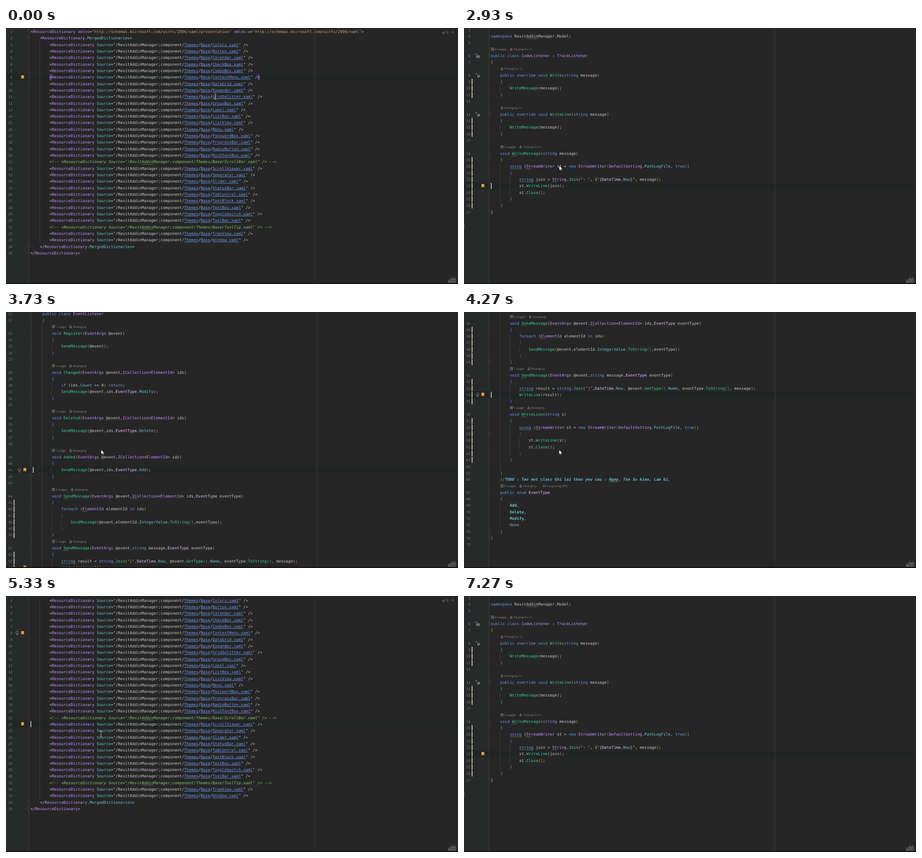
Write an HTML page that moves like this. It is 995x563 px and loops after 7390 ms.

```html
<!DOCTYPE html>
<html lang="en">
<head>
<meta charset="utf-8">
<title>Jumping between bookmarks</title>
<style>
html, body { margin: 0; width: 100%; height: 100%; overflow: hidden; background: #262626 }
svg { display: block }
text { white-space: pre; text-rendering: geometricPrecision; font: 8.655px "DejaVu Sans Mono", "Noto Sans Mono", monospace }
.num { font-size: 7.5px; fill: #747474; text-anchor: end }
.hint { font: 6.4px "Open Sans", "Noto Sans", sans-serif; fill: #8a8a8a }
.line { stroke: #3f3f3f; fill: none }
.thin { stroke: #959595; stroke-width: .8; fill: none }
</style>
</head>
<body>
<svg id="stage" width="995" height="563" viewBox="0 0 995 563"></svg>
<script>
const CW = 5.21, LH = 14.32, LOOP = 7390;
const GRAY = '#c4c4c4', BLUE = '#6c95eb', PURPLE = '#c191ff', CYAN = '#66c3cc',
  GREEN = '#39cc9b', STRING = '#c9a26d', LILAC = '#e1bfff', COMMENT = '#85c46c';
const PAREN = ['#e0a63e', '#4fae62', '#4d8ff0'];
const BRACE = ['#e0a63e', '#4fae62', '#4a86e8', '#46578a'];

const xmlRules = [
  [/<!--.*/y, COMMENT, 'font-style:italic'],
  [/"http[^"]*"/y, STRING],
  [/Themes|Base|\w+\.xaml/y, BLUE, 'text-decoration:underline 1px;text-underline-offset:1.4px;text-decoration-skip-ink:none'],
  [/Source|MergedDictionaries/y, CYAN],
  [/ResourceDictionary|xmlns(:x)?/y, PURPLE],
  [/\w+|./y, GRAY]
];
const codeRules = [
  [/\/\//y, COMMENT, 'font-style:italic'],
  [/TODO.*/y, '#62b8d0', 'font-style:italic;font-weight:bold'],
  [/"[^"{}]*"|\$"|"/y, STRING],
  [/\b(namespace|public|class|override|void|string|using|new|true|foreach|in|enum|if|return)\b/y, BLUE],
  [/\b(EventType|DateTime)\b/y, LILAC],
  [/\b(CodeListener|TraceListener|EventListener|StreamWriter|String|DefaultSetting|EventArgs|ICollection|ElementId)\b/y, PURPLE],
  [/\b(Add|Delete|Modify)(?=,)/y, CYAN, 'font-weight:bold'],
  [/\bNone\b/y, '#787878', 'font-weight:bold'],
  [/\w+(?=\()/y, GREEN],
  [/(?<=\.)(?!Model)[A-Z]\w*/y, CYAN],
  [/@?\w+|./y, GRAY]
];

const esc = s => s.replace(/&/g, '&amp;').replace(/</g, '&lt;');
const span = (s, fill, css = '') => `<tspan fill="${fill}" style="${css}">${esc(s)}</tspan>`;
const path = (d, attrs) => `<path d="${d}" ${attrs}/>`;
const move = (x, y, body, id = '') => `<g id="${id}" transform="translate(${x} ${y})">${body}</g>`;

function paint(s, rules) {
  let out = '', i = 0, depth = 0;
  while (i < s.length) {
    for (const [re, fill, css] of rules) {
      re.lastIndex = i;
      const m = re.exec(s);
      if (!m) continue;
      const word = m[0];
      const color = word === '(' ? PAREN[depth++] : word === ')' ? PAREN[--depth] : fill;
      out += span(word, color, css);
      i += word.length;
      break;
    }
  }
  return out;
}

// Spelling and analysis marks: text between two tildes gets underlined
function marks(raw, x, y) {
  let col = 0;
  return raw.split('~').map((part, i) => {
    const from = x + col * CW, w = part.length * CW;
    col += part.length;
    if (i % 2 === 0) return '';
    return part.length > 3
      ? path(`M${from} ${y + 6}` + 'l1.3 -1.3l1.3 1.3'.repeat(w / 2.6), 'fill="none" stroke="#6b9a58" stroke-width=".8"')
      : path(`M${from} ${y + 5.5}h${w}`, 'stroke="#8aa878" stroke-width="1.2" stroke-dasharray="1.3 1.6"');
  }).join('');
}

const fold = (x, y) => path(`M${x - 2.5} ${y - 3}h5v4l-2.5 2.5l-2.5 -2.5zM${x - 1} ${y - .5}h2`, 'fill="#262626" stroke="#464646" stroke-width=".8"');
const flag = (x, y) => path(`M${x - 3} ${y - 4.3}h6v8.2l-3 -2.4l-3 2.4z`, 'fill="#e3a33c"');

const hintIcons = [
  'M0 -2.7h5.4v5.4h-5.4zM1.5 1.2l2.4 -2.4m-1.8 0h1.8v1.8',
  'M2.7 -2.8a1.3 1.3 0 1 1 -.1 0zM.3 2.6q0 -2.4 2.4 -2.4t2.4 2.4z',
  'M1 2.2a2.6 2.6 0 1 1 3.4 0M1.4 2.6v-2.2M4 2.6v-2.2'
];
function hint(row, x0, y) {
  const [indent, ...parts] = row.slice(1).split('|');
  let x = x0 + indent * CW + 1;
  return parts.map((label, i) => {
    if (!label) return '';
    const out = move(x, y, path(hintIcons[i], 'class="thin"')) + `<text class="hint" x="${x + 7.6}" y="${y + 2.5}">${label}</text>`;
    x += 16 + (i ? 36 : label.length * 3.15);
    return out;
  }).join('');
}

// rows: code lines; those starting with '#' are unnumbered hints
function page(id, x0, y0, first, rows, rules, changed, extra) {
  let n = first, out = path(`M${x0 - 3.5} -600V1200M${x0 + 625.4} -600V1200`, 'class="line"');
  const open = [];
  rows.forEach((raw, r) => {
    const y = y0 + r * LH;
    if (raw[0] === '#') { out += hint(raw, x0, y); return; }
    const line = raw.replace(/~/g, ''), s = line.trim(), indent = line.length - line.trimStart().length;
    const x = x0 + indent * CW;
    let body = '';
    if (s === '{' || s === '}') {
      let color = BRACE[indent / 4];
      if (s === '{') {
        open.push(y);
        const afterUsing = /using/.test(rows[r - 1]);
        out += fold(x0 - 4, afterUsing ? y : y - LH);
      } else {
        const top = open.pop();
        if (top === undefined) color = '#8a8a8a';
        else if (indent) out += path(`M${x - .2} ${top + 7}V${y - 7}`, 'class="line"');
        out += fold(x0 - 4, y);
      }
      body = span(s, color);
    } else body = paint(s, rules);
    out += `<text class="num" x="14" y="${y + 3}">${n}</text><text x="${x}" y="${y + 3}">${body}</text>`;
    out += marks(raw, x0, y);
    if (changed.some(([a, b]) => n >= a && n <= b)) out += `<rect x="16.8" y="${y - 6.3}" width="2" height="12.8" fill="#cbbfa6"/>`;
    n++;
  });
  return `<g id="${id}">${out}${extra}</g>`;
}

// XAML page
const lineY = n => 8 + (n - 1) * LH;
const themes = ('Colors Button Calendar CheckBox ComboBox ContextMenu DataGrid Expander GridSplitter GroupBox Label ListBox ' +
  'ListView Menu PasswordBox ProgressBar RadioButton RichTextBox ScrollBar ScrollViewer Separator Slider StatusBar ' +
  'TabControl TextBlock TextBox ToggleSwitch ToolBar ToolTip TreeView Window').split(' ');
const entry = name => {
  const off = /ScrollBar|ToolTip/.test(name);
  const tag = `<ResourceDictionary Source="/${off ? 'Revit~Addin~Manager' : 'RevitAddinManager'};component/Themes/Base/${name}.xaml" />`;
  return ' '.repeat(8) + (off ? `<!-- ${tag} -->` : tag);
};
const schema = 'http://schemas.microsoft.com/winfx/2006/xaml';
const xaml = [
  `<ResourceDictionary xmlns="${schema}/presentation" xmlns:x="${schema}">`,
  '    <ResourceDictionary.MergedDictionaries>',
  ...themes.map(entry),
  '    </ResourceDictionary.MergedDictionaries>',
  '</ResourceDictionary>'
];
const xamlExtra = [1, 2, 34, 35].map(n => fold(50, lineY(n))).join('') +
  path(`M74.5 ${lineY(3) - 7}V${lineY(33) + 7}`, 'class="line"') +
  flag(36.5, lineY(8)) + `<g id="mark22">${flag(36.5, lineY(22))}</g>`;

// Listener page
const listener = `

namespace Revit~Addin~Manager.Model;

#0|2 usages|Thoang Vu +1
public class CodeListener : TraceListener
{
#4||Thoang Vu +1
    public override void Write(string message)
    {
        WriteMessage(message);
    }

#4||thoangray +1
    public override void WriteLine(string message)
    {
        WriteMessage(message);
    }

#4|2 usages|Thoang Vu +1
    void ~Wr~iteMessage(string message)
    {
        ~using~ (~St~reamWriter st = new StreamWriter(DefaultSetting.PathLogFile, true))
        {
            ~string~ join = ~St~ring.Join(": ", $"{DateTime.Now}", message);
            st.WriteLine(join);
            st.Close();
        }
    }
}`.split('\n').slice(1);
const override = y => path(`M25 ${y - 2}l2.2 -2.4l2.2 2.4`, `fill="none" stroke="${PURPLE}"`) +
  `<circle cx="32" cy="${y + 2}" r="2.1" fill="none" stroke="#b5b5b5" stroke-width="1.1"/>`;
const listenerExtra = [60.9, 103.9, 189.8].map(override).join('') +
  path('M27.7 60v5.4', 'stroke="#b5b5b5" stroke-width="1.2"') +
  path('M.5 430v14', 'stroke="#555"') + flag(41.5, 347.3);

// Event page
const handler = (name, kind) => `#8|1 usage|thoangray
        void ${name}(EventArgs @event,ICollection<ElementId> ids)
        {
            SendMessage(@event,ids,EventType.${kind});
        }
`;
const events = `
    public class EventListener
    {
#8|1 usage|thoangray
        void Register(EventArgs @event)
        {
            SendMessage(@event);
        }

#8|1 usage|thoangray
        void Changed(EventArgs @event,ICollection<ElementId> ids)
        {
            if (ids.Count == 0) return;
            SendMessage(@event,ids,EventType.Modify);
        }

${handler('Deleted', 'Delete')}
${handler('Added', 'Add')}
#8|3 usages|thoangray
        void ~Se~ndMessage(EventArgs @event,~IC~ollection<ElementId> ids,EventType eventType)
        {
            foreach (~El~ementId elementId in ids)
            {
                SendMessage(@event,elementId.IntegerValue.ToString(),eventType);
            }
        }
#8|1 usage|thoangray
        void ~Se~ndMessage(EventArgs @event,string message,EventType eventType)
        {
            ~string~ result = string.Join("|",DateTime.Now, @event.GetType().Name, eventType.ToString(), message);
            WriteLine(result);
        }
#8|1 usage|thoangray
        void ~Wr~iteLine(string s)
        {
            ~using~ (~St~reamWriter st = new StreamWriter(DefaultSetting.PathLogFile, true))
            {
                st.WriteLine(s);
                st.Close();
            }
        }

    }
    //TODO : Tao mot class Ghi lai theo yeu cau : ~Ngay~, Ten Su kien, Lam Gi,
#4|5 usages|thoangray|4 exposing APIs
    public enum EventType
    {
        Add,
        Delete,
        Modify,
        None
    }
}
`.split('\n');
const eventsTop = 24.5 - 29 * LH, upperMark = 24.5 - 4 * LH, SHIFT = 347.3 - upperMark;

const bulb = path('M-1.6 2.2q0 -1.2 -.8 -2a2.9 2.9 0 1 1 4.8 0q-.8 .8 -.8 2zM-1.3 3.8h2.6M-.8 5.2h1.6M0 2v-2.5', 'class="thin"');
const hammer = path('M23.5 307.5l5.5 6', 'stroke="#a8a8a8" stroke-width="1.9"') +
  path('M19.6 308.4l3.4 -4.6h2.4l.8 1.6l-4 3.6z', 'fill="#b4b4b4"');
const status = path('M960.3 9.6l1.8 2l4.6 -4.4', 'fill="none" stroke="#57964d" stroke-width="1.2"') +
  path('M961 13h5', 'stroke="#57964d" stroke-width=".8" stroke-dasharray="1.5 1"') +
  '<text class="hint" x="969.3" y="12.4" style="font-size:8px">2</text>' +
  path('M980.6 10.6l2.6 -2.6l2.6 2.6', 'fill="none" stroke="#a0a0a0"');
const pencils = [[973.3, 553], [979.3, 548.5], [985.2, 548.5]].map(([x, y]) =>
  path(`M${x} 559.5V${y + 4}l2.4 -4l2.4 4V559.5zM${x} ${y + 4.5}h4.8M${x + 2.4} ${y + 5}V559`, 'fill="none" stroke="#8c8c8c" stroke-width=".8"')).join('');

document.getElementById('stage').innerHTML =
  '<rect width="995" height="563" fill="#262626"/>' +
  '<rect id="gutter" height="563" fill="#282a2a"/>' +
  '<rect id="row" width="995" height="14.3" fill="#212525"/>' +
  `<g id="pair" fill="#543a78"><rect x="95.6" y="101.2" width="5.4" height="14"/><rect x="553.6" y="101.2" width="5.4" height="14"/></g>` +
  page('xaml', 54, 8, 1, xaml, xmlRules, [], xamlExtra) +
  page('listener', 59, 3.6, 3, listener, codeRules, [[9, 11], [14, 16], [19, 26]], listenerExtra) +
  page('events', 59, eventsTop, 20, events, codeRules, [[45, 50], [52, 55], [57, 63]], flag(41.5, 181.9) + flag(41.5, upperMark)) +
  `<g id="hammer">${hammer}</g><g id="status">${status}</g>` + pencils +
  '<rect y="560.5" width="995" height="2.5" fill="#1b1518"/>' +
  move(0, 0, bulb, 'bulb') +
  '<rect id="caret" width="1.4" height="13" fill="#f0f0f0"/>' +
  move(0, 0, path('M-2 -6h1.4l.6 .6l.6 -.6h1.4M0 -5.4v10.8M-2 6h1.4l.6 -.6l.6 .6h1.4', 'fill="none" stroke="#d8d8d8" stroke-width=".9"'), 'beam') +
  move(0, 0, path('M0 0v10l2.3 -2l1.6 3.3l1.6 -.7l-1.6 -3.2h3.1z', 'fill="#fff" stroke="#111" stroke-width=".5"'), 'arrow');

// time, page, scroll, caret row, caret x (0 = off), bulb y (0 = none)
const SCROLL = -26.8;
const steps = [
  [0, 'xaml', 0, lineY(8), 0, 0],
  [470, 'xaml', 0, lineY(9), 522.5, 0],
  [1070, 'xaml', 0, lineY(22), 199.9, 0],
  [1930, 'xaml', 0, lineY(22), 0, 0],
  [2270, 'xaml', 0, lineY(22), 199.9, 0],
  [2930, 'listener', 0, 347.3, 59.8, 0],
  [3200, 'listener', 0, 347.3, 59.8, 347.3],
  [3600, 'events', SHIFT, 347.3, 59.8, 0],
  [3730, 'events', SHIFT, 347.3, 59.8, 347.3],
  [4130, 'events', 0, 181.9, 59.8, 0],
  [4270, 'events', 0, 181.9, 59.8, 181.9],
  [4800, 'xaml', 0, lineY(8), 54.6, 0],
  [5000, 'xaml', 0, lineY(8), 54.6, lineY(8)],
  [5330, 'xaml', SCROLL, lineY(22) + SCROLL, 54.6, lineY(8) + SCROLL],
  [5400, 'xaml', SCROLL, lineY(22) + SCROLL, 54.6, 0],
  [5870, 'listener', 0, 347.3, 59.8, 0],
  [6070, 'listener', 0, 347.3, 59.8, 347.3],
  [6600, 'listener', 0, 347.3, 0, 347.3],
  [7270, 'listener', 0, 347.3, 0, 0]
];
// time, x, y of the mouse
const trail = [
  [0, 461, 151], [330, 521, 124], [470, 521, 124], [800, 207, 281], [866, 205, 292], [930, 201, 306],
  [1130, 201, 306], [1200, 210, 303], [6530, 209, 303], [6930, 32, 549], [LOOP, 32, 549]
];

const $ = id => document.getElementById(id);
const show = (id, on) => $(id).setAttribute('display', on ? 'inline' : 'none');
const place = (id, x, y) => $(id).setAttribute('transform', `translate(${x} ${y})`);
const put = (id, x, y) => { $(id).setAttribute('x', x); $(id).setAttribute('y', y); };

function mouse(t) {
  const q = Math.floor((t + 4) * .015) / .015;
  const i = Math.max(1, trail.findIndex(k => k[0] > q));
  const [t0, x0, y0] = trail[i - 1], [t1, x1, y1] = trail[i];
  const p = (q - t0) / (t1 - t0), e = p * p * (3 - 2 * p);
  return [x0 + (x1 - x0) * e, y0 + (y1 - y0) * e];
}

function draw() {
  const t = performance.now() % LOOP;
  const [, name, scroll, rowY, caretX, bulbY] = steps.filter(s => s[0] <= t).pop();
  const inXaml = name === 'xaml';
  for (const id of ['xaml', 'listener', 'events']) show(id, id === name);
  place(name, 0, scroll);
  $('gutter').setAttribute('width', inXaml ? 50 : 55);
  put('row', 0, rowY - 7.2);
  put('caret', caretX - .6, rowY - 6.5);
  show('caret', caretX);
  place('bulb', inXaml ? 24.5 : 29.6, bulbY);
  show('bulb', bulbY);
  show('pair', t < 470);
  show('mark22', t >= 2270);
  show('hammer', t >= 1200 && t < 2930);
  show('status', inXaml);
  const [x, y] = mouse(t);
  place('beam', x, y);
  place('arrow', x, y);
  show('beam', inXaml);
  show('arrow', !inXaml && t < 7070);
  requestAnimationFrame(draw);
}
draw();
</script>
</body>
</html>
```
